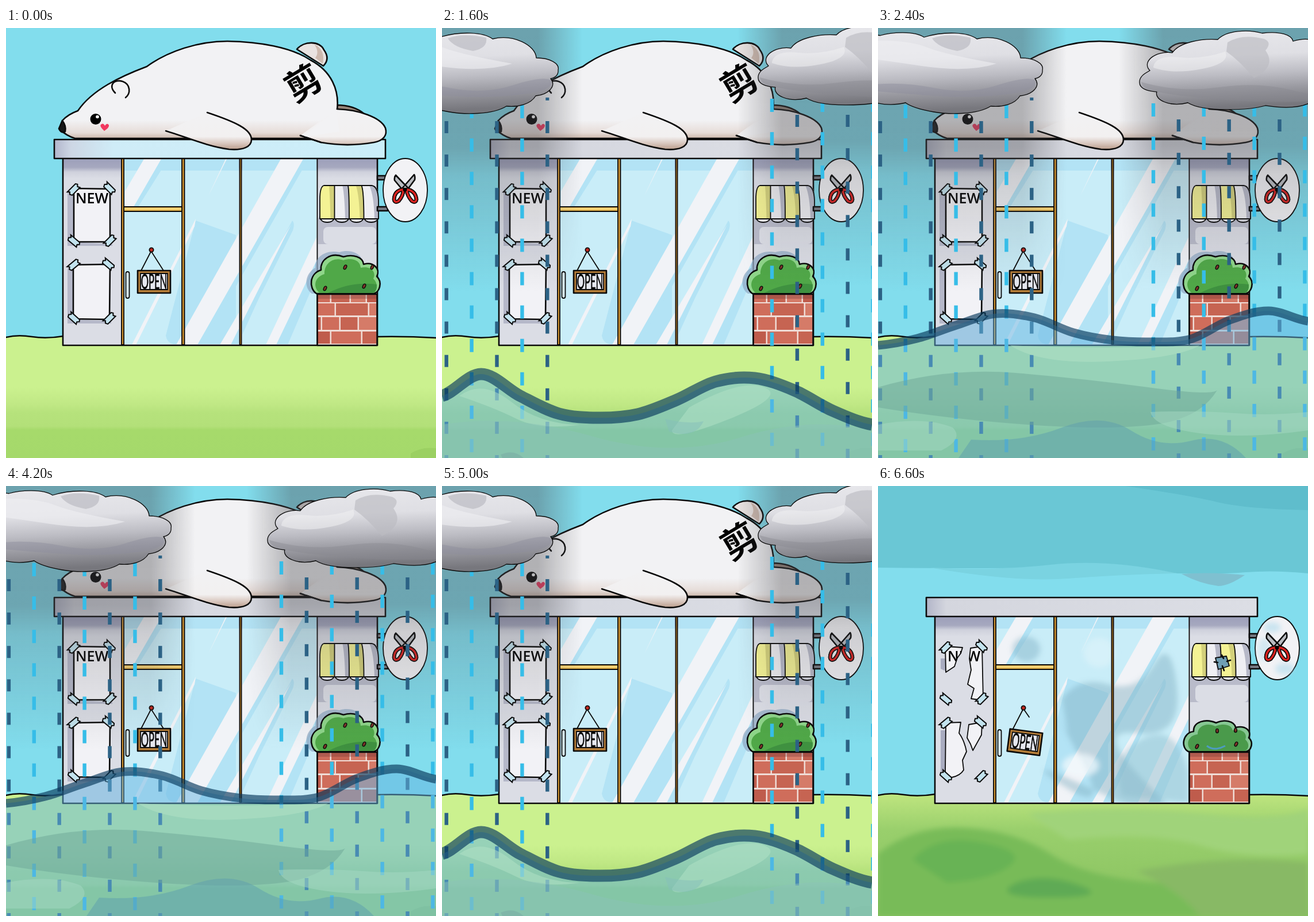
These frames come from a looping animation (748x748 px, 8000 ms). An HTML page:

```html
<!DOCTYPE html>
<html lang="en">
<head>
<meta charset="utf-8">
<title>Rain over the barber shop</title>
<style>
  html, body { margin: 0; width: 100%; height: 100%; overflow: hidden; background: #82dded; }
  svg { display: block; width: 100vw; height: 100vh; }
  .ink { stroke: #0a0a0a; stroke-width: 2.6; stroke-linejoin: round; stroke-linecap: round; }
  .thin { stroke-width: 1.8; }
  .line { fill: none; }
  .paper { fill: #f2f2f6; }
  .tape { fill: #c3e3ee; stroke: #0a0a0a; stroke-width: 2; }
  .new { font: 600 25px "Open Sans", sans-serif; }
  .open { font: 400 36px Lato, sans-serif; stroke: #111; stroke-width: .7; }
  .kanji { font: 700 62px "Noto Sans CJK JP", "Noto Sans CJK", sans-serif; }
</style>
</head>
<body>
<svg id="stage" viewBox="0 0 748 748">
  <defs>
    <linearGradient id="grass" x2="0" y2="1">
      <stop offset="0" stop-color="#cbf18f"/><stop offset=".42" stop-color="#cbf18f"/>
      <stop offset=".56" stop-color="#c0e885"/><stop offset=".63" stop-color="#b6e27c"/>
      <stop offset=".74" stop-color="#b3e079"/><stop offset=".77" stop-color="#a6da6b"/>
      <stop offset="1" stop-color="#a5d96b"/>
    </linearGradient>
    <linearGradient id="wetGrass" x2="0" y2="1">
      <stop offset="0" stop-color="#bfe57f"/><stop offset=".3" stop-color="#99cf6c"/>
      <stop offset="1" stop-color="#88c15f"/>
    </linearGradient>
    <linearGradient id="wall" x2="0" y2="1">
      <stop offset="0" stop-color="#9c9fba"/><stop offset=".05" stop-color="#a6a8bf"/>
      <stop offset=".075" stop-color="#cfd1dc"/><stop offset=".11" stop-color="#dbdde5"/>
      <stop offset="1" stop-color="#dbdde5"/>
    </linearGradient>
    <linearGradient id="roofBlue">
      <stop offset="0" stop-color="#b2b6cc"/><stop offset=".05" stop-color="#cdd6e4"/>
      <stop offset=".18" stop-color="#cfecf7"/><stop offset="1" stop-color="#cbeef9"/>
    </linearGradient>
    <linearGradient id="roofGrey">
      <stop offset="0" stop-color="#b2b5c8"/><stop offset=".06" stop-color="#d4d6de"/>
      <stop offset="1" stop-color="#dcdee5"/>
    </linearGradient>
    <linearGradient id="fur" gradientUnits="userSpaceOnUse" x1="0" y1="20" x2="0" y2="200">
      <stop offset="0" stop-color="#f2f2f4"/><stop offset=".78" stop-color="#f2f2f4"/>
      <stop offset=".9" stop-color="#e6dcd8"/><stop offset=".96" stop-color="#cbb5a8"/>
      <stop offset="1" stop-color="#bda18f"/>
    </linearGradient>
    <linearGradient id="limb" gradientUnits="userSpaceOnUse" x1="0" y1="140" x2="0" y2="212">
      <stop offset="0" stop-color="#f2f2f4"/><stop offset=".68" stop-color="#f2f0f0"/>
      <stop offset=".84" stop-color="#d9c8bf"/><stop offset="1" stop-color="#b89a88"/>
    </linearGradient>
    <linearGradient id="gold">
      <stop offset="0" stop-color="#8a5416"/><stop offset=".5" stop-color="#e9a93a"/>
      <stop offset="1" stop-color="#8a5416"/>
    </linearGradient>
    <linearGradient id="lintel" x2="0" y2="1">
      <stop offset="0" stop-color="#c98a22"/><stop offset=".4" stop-color="#fbe08a"/>
      <stop offset="1" stop-color="#d99a28"/>
    </linearGradient>
    <linearGradient id="puff" x2=".12" y2="1">
      <stop offset="0" stop-color="#e8e8ec"/><stop offset=".36" stop-color="#dfdfe4"/>
      <stop offset=".6" stop-color="#bcbcc3"/><stop offset=".78" stop-color="#9b9ba2"/>
      <stop offset="1" stop-color="#77777d"/>
    </linearGradient>
    <linearGradient id="gloom" gradientUnits="userSpaceOnUse" x1="0" y1="0" x2="0" y2="460">
      <stop offset="0" stop-color="#4b4b50" stop-opacity=".4"/>
      <stop offset=".45" stop-color="#4b4b50" stop-opacity=".38"/>
      <stop offset=".56" stop-color="#4b4b50" stop-opacity=".22"/>
      <stop offset=".8" stop-color="#4b4b50" stop-opacity=".1"/>
      <stop offset="1" stop-color="#4b4b50" stop-opacity="0"/>
    </linearGradient>
    <linearGradient id="fadeRight" gradientUnits="userSpaceOnUse" x1="335" x2="412" y1="0" y2="0">
      <stop stop-color="#fff"/><stop offset="1" stop-color="#000"/>
    </linearGradient>
    <linearGradient id="fadeLeft" gradientUnits="userSpaceOnUse" x1="335" x2="412" y1="0" y2="0">
      <stop stop-color="#000"/><stop offset="1" stop-color="#fff"/>
    </linearGradient>
    <mask id="maskL" maskUnits="userSpaceOnUse" x="-500" y="-20" width="1800" height="500">
      <rect x="-500" y="-20" width="1800" height="500" fill="url(#fadeRight)"/></mask>
    <mask id="maskR" maskUnits="userSpaceOnUse" x="-500" y="-20" width="1800" height="500">
      <rect x="-500" y="-20" width="1800" height="500" fill="url(#fadeLeft)"/></mask>
    <clipPath id="pane"><path d="M206 228H305V550H206ZM311 228H405V550H311ZM411 228H540V550H411Z"/></clipPath>
    <clipPath id="tornNew"><path id="tornA" d="M117 279L147 281L144 291L138 299L133 314L118 324ZM161 282L181 279L183 373L162 370L167 352L156 345L162 320L159 300Z"/></clipPath>
    <filter id="soft" x="-30%" y="-30%" width="160%" height="160%"><feGaussianBlur stdDeviation="5"/></filter>
  </defs>

  <!-- sky and ground -->
  <rect width="748" height="748" fill="#82dded"/>
  <g class="worn">
    <path d="M0 0H748V152Q690 146 640 150T520 152Q430 140 300 142T0 142Z" fill="#6ac7d5"/>
    <path d="M430 0H748V42Q640 40 590 28T430 0Z" fill="#5fbdcc"/>
    <path d="M90 142Q200 148 300 137T520 152Q420 154 330 161T90 142Z" fill="#7ad3e1"/>
    <path d="M528 153Q580 149 638 155Q610 174 592 174Q560 170 528 153Z" fill="#7fc0d0"/>
  </g>
  <path class="calm" d="M0 538Q20 533 45 537T100 536H646Q695 536 748 539V748H0Z" fill="url(#grass)"/>
  <path class="calm" d="M704 740Q722 728 748 731V748H704Z" fill="#9bd062"/>
  <g class="worn">
    <path d="M0 538Q20 533 45 537T100 536H646Q695 536 748 539V748H0Z" fill="url(#wetGrass)"/>
    <g filter="url(#soft)">
      <path d="M0 640Q60 590 150 595T300 640T480 690T620 748H0Z" fill="#78bb58"/>
      <path d="M60 650Q100 605 180 620T230 660T120 690Z" fill="#67b355"/>
      <path d="M240 690Q290 672 350 694T300 716T240 690Z" fill="#5eaa54"/>
      <path d="M260 570Q420 555 560 570T748 562V640Q640 650 560 625T330 615Z" fill="#a0d37a"/>
      <path d="M450 670Q600 640 748 655V748H560Q520 700 450 670Z" fill="#88b965"/>
    </g>
  </g>
  <path class="ink line" d="M0 538Q20 533 45 537T100 536M646 537Q695 536 748 539"/>

  <!-- shop -->
  <rect x="99" y="226" width="547" height="326" fill="url(#wall)"/>
  <rect x="543" y="330" width="102" height="46" fill="#b9bbca"/>
  <rect x="552" y="346" width="92" height="30" rx="8" fill="#dbdde5"/>
  <g clip-path="url(#pane)">
    <rect x="204" y="226" width="338" height="326" fill="#c9edf8"/>
    <g fill="#b3e3f5">
      <path d="M204 226H542V248H204ZM330 335L278 535Q280 551 300 551H400V360Z"/>
      <path d="M517 228H526L342 551H333ZM270 228H282L230 311H218ZM498 335Q503 340 499 352L440 470L403 551H384Z"/>
      <path d="M541 400V432L490 551H468Z"/>
    </g>
    <g fill="#f1f3f7">
      <path d="M240 228H270L222 311H207V284ZM382 228H384L352 292ZM478 228H517L333 551H296Z"/>
      <path d="M330 332L328 345L226 551H219ZM496 342L411 485L372 551H391L411 511ZM541 362V403L470 551H452Z"/>
    </g>
    <g class="worn" filter="url(#soft)">
      <path d="M320 370Q350 330 400 345T480 310T520 350T450 430T470 520T400 540T320 520T350 470T330 430Z" fill="#79a9bd" opacity=".42"/>
      <ellipse cx="258" cy="284" rx="24" ry="22" fill="#7fb0c4" opacity=".45"/>
      <ellipse cx="352" cy="486" rx="32" ry="19" fill="#f1f8fc" opacity=".75"/>
      <path d="M425 540Q400 470 460 440T540 500V551Z" fill="#8dbaca" opacity=".45"/>
      <ellipse cx="385" cy="290" rx="28" ry="26" fill="#e3f5fb" opacity=".5"/>
    </g>
  </g>
  <g id="frames"></g>
  <rect x="99" y="226" width="547" height="326" class="ink line"/>
  <path class="ink thin line" d="M541.5 228V551"/>
  <rect x="205" y="311" width="101" height="8" fill="url(#lintel)" class="ink thin"/>
  <rect x="208.500" y="424" width="6" height="46" rx="3" fill="#d8eef6" class="ink thin"/>
  <rect x="84" y="194" width="576" height="33" id="roof" class="ink"/>

  <!-- posters -->
  <g class="calm">
    <path d="M107 285H117V372L185 376V379H107ZM107 418H117V507L183 510V514H107Z" fill="#a9acc0" opacity=".75"/>
    <path class="ink paper" d="M118 279L181 280V372L118 372ZM117 412L181 411L180 507L117 506Z"/>
    <text x="121" y="305" class="new">NEW</text>
  </g>
  <g class="worn">
    <path d="M109 300H118V322L109 318ZM109 425H117V500L109 496Z" fill="#a9acc0"/>
    <use href="#tornA" class="ink thin paper"/>
    <path class="ink thin paper" d="M118 412L144 411L141 430Q150 442 154 462L147 477L149 494Q143 504 128 507L117 500ZM158 415L181 411L180 433L165 460L161 449L155 438Z"/>
    <text x="121" y="305" class="new" clip-path="url(#tornNew)">NEW</text>
  </g>
  <g id="tapes"></g>

  <!-- door sign -->
  <path class="ink thin line" d="M252 389L235 422"/>
  <path class="ink thin line calm" d="M253 389L274 422"/>
  <path class="ink thin line worn" d="M254 389L263 402"/>
  <g id="board">
    <rect x="229" y="422" width="57" height="39" fill="#b57d38" class="ink"/>
    <rect x="234" y="427" width="47" height="28" fill="#e6e8f0" class="ink thin"/>
    <text class="open" text-anchor="middle" transform="translate(257.500 454) scale(.46 1)">OPEN</text>
  </g>
  <circle cx="253" cy="386" r="3.600" fill="#c3291f" class="ink thin"/>

  <!-- awning -->
  <g id="awning"></g>
  <g class="worn">
    <path class="ink thin" fill="#6f9fb4" d="M587 299L606 296L611 313L592 319Z"/>
    <path class="ink line" stroke-width="1" d="M585 306L591 307M598 294L601 300M607 305L613 303M599 313L602 321"/>
  </g>

  <!-- planter -->
  <g class="calm">
    <path d="M532 462C518 452 519 428 538 417C537 399 555 385 580 390C596 385 612 390 618 400L600 462Z" fill="#8fa9c4" opacity=".7"/>
    <path id="bush" class="ink" fill="#8fd68a" d="M540 462C526 452 528 427 548 421C546 404 564 389 587 398C603 393 621 398 622 411C639 406 652 419 645 432C656 443 649 460 640 462Z"/>
    <path fill="#50a848" d="M546 461C534 452 535 434 554 428C553 411 568 397 587 404C602 399 616 404 617 417C634 413 645 424 639 436C649 446 645 458 638 461Z"/>
    <path fill="#3f9140" d="M560 461Q600 440 645 446Q646 457 639 461Z"/>
  </g>
  <g class="worn">
    <path class="ink" fill="#86c793" d="M540 462C526 455 530 429 549 427C548 410 570 404 588 412C602 405 620 409 622 420C640 416 650 426 645 438C654 446 649 461 640 462Z"/>
    <path fill="#4a9a4b" d="M546 461C535 453 537 434 556 432C556 417 572 411 587 418C601 412 615 415 617 425C634 422 643 430 639 441C647 448 645 458 638 461Z"/>
    <path d="M572 452Q585 462 604 452" fill="none" stroke="#4d9bc0" stroke-width="3"/>
  </g>
  <g id="berries"></g>
  <g id="bricks"></g>

  <!-- hanging sign -->
  <path class="ink" fill="#777b84" d="M646 257H660V264H646ZM646 311H664V318H646Z"/>
  <ellipse cx="694.500" cy="282" rx="38.500" ry="55" fill="#f2f2f5" class="ink thin"/>
  <g class="worn" opacity=".55" filter="url(#soft)">
    <ellipse cx="686" cy="246" rx="15" ry="9" fill="#a8d9ec"/><ellipse cx="708" cy="318" rx="17" ry="10" fill="#a8d9ec"/>
    <ellipse cx="672" cy="284" rx="11" ry="20" fill="#b9e1ef"/>
  </g>
  <path class="ink" stroke-width="1.600" fill="#babdc2" d="M691 283L676 265Q675 259 678 256L700 279ZM697 283L711 264Q712 258 710 255L689 279Z"/>
  <g fill="none" stroke-linecap="round">
    <path id="grip" d="M690 281Q676 283 675 298Q676 305 683 301Q691 292 691 282M698 281Q712 283 714 298Q713 305 706 301Q698 292 697 282" stroke="#0a0a0a" stroke-width="6.500"/>
    <use href="#grip" style="stroke:#d3201f;stroke-width:3.500px"/>
    <path d="M690 281Q676 283 675 298Q676 305 683 301Q691 292 691 282M698 281Q712 283 714 298Q713 305 706 301Q698 292 697 282" stroke="#d8211f" stroke-width="3.500"/>
  </g>
  <circle cx="694" cy="281" r="3.500"/>

  <!-- bear -->
  <g class="calm">
    <path class="ink" fill="#97857a" d="M574 134Q606 134 624 150L580 148Z"/>
    <path class="ink" fill="#e9e3e1" d="M506 37C518 22 546 22 553 38C561 49 560 58 552 66Z"/>
    <path d="M536 28Q556 38 551 62L538 52Q546 42 536 28Z" fill="#cdb9ae"/>
    <path class="ink" fill="url(#fur)" d="M98 161Q108 150 125 144C150 107 200 84 245 67C282 40 335 23 385 23C440 24 496 33 530 56C566 75 580 108 576 142L580 192H120Q106 188 93 176Z"/>
    <path class="ink" fill="url(#limb)" d="M576 141C612 142 652 155 660 174C664 187 656 196 640 199C612 204 582 205 548 199L512 187"/>
    <path d="M515 190L574 142L580 180Z" fill="#f2f2f4"/>
    <path class="ink line" d="M512 187L548 199"/>
    <path class="ink" fill="url(#limb)" d="M278 179C312 189 350 206 388 211C412 213 427 207 427 194C427 176 398 163 350 147"/>
    <path class="ink line" d="M190 113C177 100 188 88 203 93C217 98 217 114 208 121"/>
    <path d="M98 161L92 175Q96 184 103 180Q105 170 98 161Z" class="ink" fill="#171717"/>
    <circle cx="156" cy="158.500" r="9.500"/><circle cx="159" cy="154.500" r="2.800" fill="#fff"/>
    <path fill="#f2385f" d="M171 179Q162 171 165 168Q169 164 172 170Q176 164 179 169Q180 173 171 179Z"/>
    <g transform="translate(517 95) rotate(-31)">
      <text class="kanji" text-anchor="middle" y="23">剪</text>
    </g>
  </g>

  <!-- weather -->
  <g class="left"><rect x="-400" y="0" width="814" height="460" fill="url(#gloom)" mask="url(#maskL)"/></g>
  <g class="right"><rect x="330" y="-10" width="900" height="470" fill="url(#gloom)" mask="url(#maskR)"/></g>
  <g id="rain"><g class="left" id="rainL"></g><g class="right" id="rainR"></g></g>
  <g id="water">
    <path id="pool" fill="#64b4e1" fill-opacity=".5"/>
    <g id="blobs"></g>
    <path id="crest" fill="none" stroke="#093a5c" stroke-opacity=".65"/>
  </g>
  <g class="left">
    <path class="ink" style="stroke-width:1.300px" fill="url(#puff)" d="M12 82C8 66 17 54 25 50C17 24 45 7 88 13C108 7 148 5 164 16C200 5 240 7 256 19C292 10 331 30 332 52C356 52 373 62 370 73C371 82 364 87 357 88C368 102 352 116 331 118C322 133 300 138 280 136C255 152 204 150 181 146C152 141 140 136 132 130C100 138 54 130 58 108C30 108 13 96 12 82Z"/>
    <path fill="#bdbdc4" opacity=".7" d="M178 18Q205 8 245 17Q248 35 222 40Q188 34 178 18Z"/>
    <path fill="#f1f1f4" opacity=".6" d="M32 48Q40 22 90 22T170 34T290 62Q240 78 160 66T32 48Z"/>
    <path fill="#8d8d9c" opacity=".45" d="M60 100Q120 92 180 104T290 100T356 90Q364 105 330 112Q260 124 180 118T60 108Z"/>
  </g>
  <g class="right">
    <path class="ink" style="stroke-width:1.300px" fill="url(#puff)" d="M371 98C370 86 384 80 389 77C374 62 398 42 428 46C440 28 478 21 507 23C522 7 560 5 584 12C616 8 636 15 638 26C666 17 696 27 694 45C720 45 738 56 736 70C738 86 726 94 724 97C738 112 712 137 668 133C642 146 604 140 590 138C562 146 482 150 455 133C424 141 396 128 401 114C384 113 371 108 371 98Z"/>
    <path fill="#bcbcc2" opacity=".65" d="M524 28Q550 12 588 22Q602 28 590 42Q610 70 570 90Q545 60 522 44Z"/>
    <path fill="#f0f0f3" opacity=".55" d="M395 70Q400 50 440 54T520 44Q530 64 480 74T395 72Z"/>
    <path fill="#88888f" opacity=".4" d="M374 97Q440 116 510 106T640 112T730 102Q724 128 668 130Q600 134 520 128T402 114Q378 112 374 97Z"/>
  </g>
</svg>

<script>
const $ = id => document.getElementById(id);
const all = name => document.querySelectorAll("." + name);
const rect = (x, y, w, h, rest) => `<rect x="${x}" y="${y}" width="${w}" height="${h}" ${rest}/>`;
const ellipse = (x, y, rx, ry, rest) => `<ellipse cx="${x}" cy="${y}" rx="${rx}" ry="${ry}" ${rest}/>`;

// Fixed parts built by rule
$("frames").innerHTML = [[201, 4], [306, 4.5], [406.5, 3]].map(([x, w]) =>
  rect(x, 227, w, 324, 'fill="url(#gold)" class="ink thin"')).join("");

$("tapes").innerHTML = [[118, 281, -45], [180, 279, 45], [118, 371, 40], [181, 370, -45],
  [118, 412, -40], [178, 411, 40], [118, 505, 42], [180, 505, -45]].map(([x, y, turn]) =>
  `<g transform="translate(${x} ${y}) rotate(${turn})">` +
  `<path class="tape" d="M-11 -5L-8 -2L-11 1L-9 5H10L8 1L11 -2L9 -5Z"/></g>`).join("");

$("berries").innerHTML = [[590, 416], [637, 416], [623, 449], [555, 453]].map(([x, y], i) =>
  (i < 2 ? `<g class="calm">` : "<g>") +
  ellipse(x, y, 2.4, 4, `transform="rotate(25 ${x} ${y})" fill="#7c3327" class="ink" style="stroke-width:1.4px"`) + "</g>").join("") +
  [[590, 426], [622, 425]].map(([x, y]) => ellipse(x, y, 2.4, 3.6, 'class="ink worn" style="stroke-width:1.4px" fill="#7c3327"')).join("");

function drawAwning() {
  const w = 25.5, left = 546;
  let out = "";
  for (let i = 0; i < 4; i++) {
    const x = left + i * w;
    out += `<path class="ink thin" fill="${i % 2 ? "#d4d5de" : "#f0f1f6"}" d="M${x} 328Q${x + 1} 338 ${x + w / 2} 338Q${x + w - 1} 338 ${x + w} 328Z"/>`;
  }
  out += `<path fill="#f0f0f4" d="M553 274H636Q647 275 648 300V332H546V298Q546 276 553 274Z"/>`;
  for (let i = 0; i < 4; i++) {
    const x = left + i * w, top = x + 4 - i * 2;
    const color = i % 2 ? "#efeff3" : "#f4f294", shade = i % 2 ? "#b7b9c8" : "#d3d07a";
    out += `<path fill="${color}" d="M${x} 332V300Q${x} 280 ${top} 275H${top + 22}Q${x + w} 282 ${x + w} 300V332Z"/>`;
    out += `<path fill="${shade}" d="M${x + w - 7} 332Q${x + w - 8} 292 ${top + 12} 275H${top + 22}Q${x + w} 282 ${x + w} 300V332Z"/>`;
    if (i) out += `<path class="ink thin line" d="M${top - 2} 274Q${x} 284 ${x} 332"/>`;
  }
  return out + `<path class="ink thin line" d="M546 332V298Q546 276 553 274H636Q647 275 648 300V332Z"/>`;
}
$("awning").innerHTML = drawAwning();

function drawBricks() {
  const rows = [[464, 13, [566, 600, 628]], [479, 21, [574, 632]], [503, 22, [550, 582, 614]], [528, 21, [566, 620]]];
  const tones = ["#cf6d5b", "#bf5c4c", "#d57b68", "#c66452"];
  let out = rect(541.5, 463, 104, 89, 'fill="#f0dcd6"'), n = 0;
  for (const [y, h, joints] of rows) {
    const xs = [542, ...joints, 647];
    for (let i = 1; i < xs.length; i++) {
      out += rect(xs[i - 1], y, xs[i] - xs[i - 1] - 2.5, h, `fill="${tones[n++ * 7 % 4]}"`);
    }
  }
  return out + rect(541.5, 463, 104, 8, 'fill="#7a3a3a" opacity=".35"') + rect(541.5, 463, 104, 89, 'class="ink line"');
}
$("bricks").innerHTML = drawBricks();

// Each cloud carries eight columns of rain, light and dark in turn
function drawRain(first) {
  let out = "";
  for (let i = 0; i < 8; i++) {
    const x = first + i * 43.9, dark = i % 2;
    const fill = `fill="${dark ? "#2c6285" : "#36bde8"}"`;
    if (dark) out += rect(x - 3, 121, 6, 5, fill);
    for (let y = dark ? 162 : 134; y < 770; y += 58.1) out += rect(x - 3.2, y, 6.4, dark ? 21 : 23, fill);
  }
  return out;
}
$("rainL").innerHTML = drawRain(44);
$("rainR").innerHTML = drawRain(395);

// Surface heights at equal steps across the stage
const waves = {
  low: {
    ys: [640, 602, 640, 671, 678, 672, 647, 615, 609, 630, 666, 690], width: 21,
    blobs: [["M30 640Q70 610 120 650T240 690Q170 700 130 680T30 640Z", "#b4e3c8"], ["M430 660Q520 610 560 625T500 680T400 700Z", "#b4e3c8"],
      ["M0 690Q120 670 260 710T520 712T748 700V748H0Z", "#8cc3b8"], ["M388 680Q430 690 455 684Q440 716 395 702Z", "#86c0bb"], ["M102 742Q125 732 142 748H105Z", "#78a9a4"]]
  },
  mid: {
    ys: [552, 540, 517, 497, 504, 530, 543, 546, 541, 508, 492, 510], width: 15,
    blobs: [["M0 625Q120 590 240 600T470 625T590 630Q560 680 480 690T260 690T0 660Z", "#6fa898"], ["M0 690Q80 675 130 695Q150 715 110 735H0Z", "#a5d9c4"],
      ["M474 668Q560 665 620 670T748 668V700Q640 715 560 705T474 668Z", "#a5d9c4"], ["M140 748L162 716Q250 722 320 695T440 700T545 718T640 748Z", "#5f9fb0"],
      ["M230 552Q400 560 560 552Q520 575 400 580T230 552Z", "#b4e3c8"]]
  },
  high: {
    ys: [412, 384, 406, 430, 433, 428, 411, 393, 387, 410, 433, 442], width: 14,
    blobs: [["M0 560Q120 545 250 560T270 600Q160 620 80 632T0 655Z", "#a9d9c5"], ["M0 650Q150 600 330 620T600 600T748 620V660Q640 690 440 670T0 720Z", "#76ad9d"],
      ["M600 590Q680 565 748 575V600Q660 605 600 590Z", "#a9d9c5"], ["M22 690Q50 665 78 690Q72 726 46 725Q18 720 22 690Z", "#4f96ab"],
      ["M0 440Q80 430 160 465T380 500T560 480V520Q400 540 240 520T0 490Z", "#7cb9dd"], ["M405 680Q440 660 495 680L465 700L470 720H415L430 700Z", "#a9d9c5"]]
  }
};

function curve(ys) {
  const gap = 748 / (ys.length - 1), at = i => ys[Math.max(0, Math.min(ys.length - 1, i))];
  let d = `M0 ${ys[0]}`;
  for (let i = 0; i < ys.length - 1; i++) {
    const y1 = at(i) + (at(i + 1) - at(i - 1)) / 6, y2 = at(i + 1) - (at(i + 2) - at(i)) / 6;
    d += `C${(i + 1 / 3) * gap} ${y1} ${(i + 2 / 3) * gap} ${y2} ${(i + 1) * gap} ${at(i + 1)}`;
  }
  return d;
}

// start, left cloud x, right cloud x, right cloud y, water
const steps = [
  { at: 0 },
  { at: 800, l: -245, r: 241, dy: -7 },
  { at: 1600, l: -168, r: 179, dy: -11, wave: "low" },
  { at: 2400, l: -84, r: 84, dy: -3, wave: "mid" },
  { at: 3200, l: 0, r: 0, dy: 0, wave: "high", rain: .75 },
  { at: 4200, l: -83, r: 84, dy: -3, wave: "mid" },
  { at: 5000, l: -168, r: 179, dy: -11, wave: "low" },
  { at: 5800, l: -245, r: 241, dy: -7 },
  { at: 6600, worn: true }
];
const LOOP = 8000;
const show = (nodes, on) => nodes.forEach(n => { n.style.display = on ? "" : "none"; });
const parts = { calm: all("calm"), worn: all("worn"), left: all("left"), right: all("right") };

function pose(s) {
  const stormy = s.l !== undefined;
  show(parts.calm, !s.worn);
  show(parts.worn, s.worn);
  show(parts.left, stormy);
  show(parts.right, stormy);
  if (stormy) {
    parts.left.forEach(n => n.setAttribute("transform", `translate(${s.l} 0)`));
    parts.right.forEach(n => n.setAttribute("transform", `translate(${s.r} ${s.dy})`));
  }
  $("rain").setAttribute("opacity", s.rain || 1);
  $("roof").setAttribute("fill", s.at ? "url(#roofGrey)" : "url(#roofBlue)");
  $("board").setAttribute("transform", s.worn ? "translate(-2 4) rotate(7.500 257 441)" : "");
  show([$("water")], s.wave);
  if (s.wave) {
    const w = waves[s.wave], d = curve(w.ys);
    $("pool").setAttribute("d", d + "V748H0Z");
    $("crest").setAttribute("d", d);
    $("crest").setAttribute("stroke-width", w.width);
    $("blobs").innerHTML = w.blobs.map(([path, fill]) => `<path d="${path}" fill="${fill}" opacity=".5"/>`).join("");
  }
}

let shown;
const begin = performance.now();
function tick() {
  const t = (performance.now() - begin) % LOOP;
  const now = steps.filter(s => s.at <= t).pop();
  if (now !== shown) pose(shown = now);
  requestAnimationFrame(tick);
}
tick();
</script>
</body>
</html>
```
